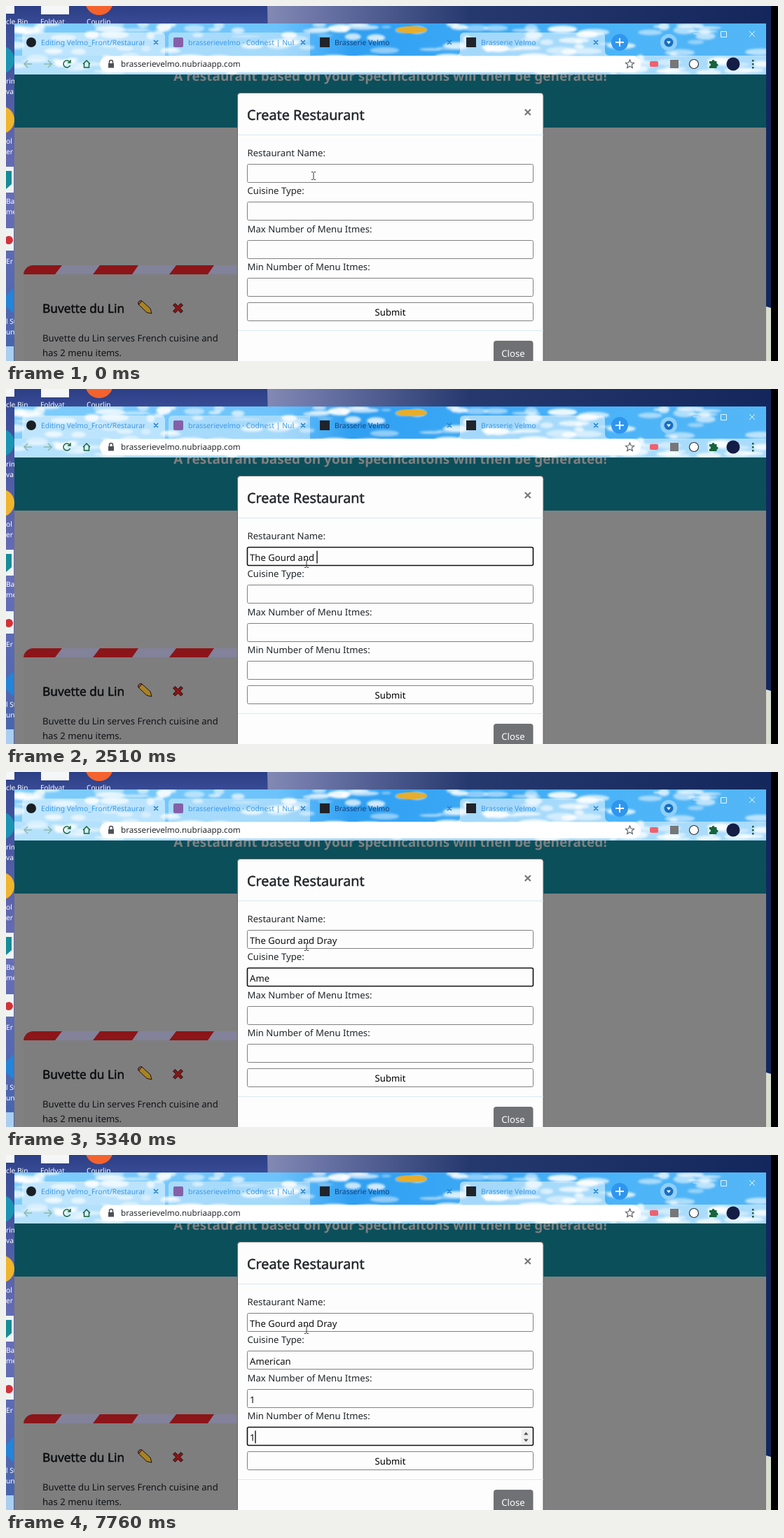
An HTML page that plays this animation: 1102x508 px, repeating every 8 s.

```html
<!DOCTYPE html>
<html lang="en">
<head>
<meta charset="utf-8">
<title>Create Restaurant</title>
<style>
  html, body { margin: 0; width: 100%; height: 100%; overflow: hidden; background: #000; }
  svg { display: block; width: 1102px; height: 508px; }
  text { font: 13.15px "Noto Sans", "Open Sans", sans-serif; text-rendering: geometricPrecision; fill: #212529; white-space: pre; }
  .bold { font-weight: 600; }
  .semi { stroke: #212529; stroke-width: .5; }
  .tab { font-size: 10.4px; fill: #3b98e6; }
  .desk text { font-size: 10.2px; fill: #fff; }
  .mid { text-anchor: middle; }
  .line { fill: none; stroke-width: 1.5; }
</style>
</head>
<body>
<svg viewBox="0 0 1102 508">
  <defs>
    <linearGradient id="wall" x2="0" y2="1">
      <stop offset="0" stop-color="#2c3f86"/><stop offset=".06" stop-color="#3a4d97"/>
      <stop offset=".5" stop-color="#6a6fb8"/><stop offset="1" stop-color="#4664ad"/>
    </linearGradient>
    <linearGradient id="night">
      <stop offset="0" stop-color="#8289b4"/><stop offset=".12" stop-color="#6670a2"/>
      <stop offset=".4" stop-color="#26396f"/><stop offset="1" stop-color="#14275c"/>
    </linearGradient>
    <linearGradient id="sky">
      <stop offset="0" stop-color="#7fcdfb"/><stop offset=".35" stop-color="#6cc3fb"/>
      <stop offset=".45" stop-color="#2f9ff2"/><stop offset=".8" stop-color="#4bb4f8"/><stop offset="1" stop-color="#54b6f6"/>
    </linearGradient>
    <filter id="soft"><feGaussianBlur stdDeviation="1.5"/></filter>
    <clipPath id="bar"><path d="M12 25H1085V98H12Z"/></clipPath>
    <clipPath id="page"><path d="M12 98H1085V508H12Z"/></clipPath>
    <clipPath id="card"><rect x="25" y="371" width="320" height="160" rx="14"/></clipPath>
    <clipPath id="tabs"><path d="M48 38H198V66H48ZM258 38H411V66H258Z"/></clipPath>
  </defs>

  <!-- Desktop -->
  <g class="desk">
    <path fill="url(#wall)" d="M0 0H400V508H0Z"/>
    <path fill="url(#night)" d="M373 0H1092V508H385Z"/>
    <path fill="#d9dfd0" d="M1085 430L1092 432V508H1085Z"/>
    <path fill="#f4f6f8" d="M50 0H90V12H50ZM0 0H12V11H0Z"/>
    <circle cx="133" cy="-7" r="20" fill="#f4622d"/>
    <circle cx="-8" cy="77" r="20" fill="#1a93b4"/>
    <circle cx="-8" cy="163" r="20" fill="#f0b52c"/>
    <path fill="#eef4f4" d="M0 230H11V267H0ZM0 318H11V350H0Z"/>
    <path fill="#168c96" d="M0 236H8V255L0 262Z"/>
    <circle cx="4" cy="335" r="6" fill="#d3323a"/>
    <path fill="#2484d8" d="M0 415L11 403V440L0 430Z"/>
    <path fill="#a9cef2" d="M0 487H11V508H0Z"/>
    <text x="0" y="26">cle Bin</text><text x="49" y="26">Foldvat</text><text x="115" y="26">Courlin</text>
    <g id="icons"></g>
  </g>

  <!-- Browser bar -->
  <g clip-path="url(#bar)">
    <path fill="url(#sky)" d="M12 25H1085V98H12Z"/>
    <path fill="#fff" opacity=".5" d="M23 71V44q0-6 6-6H221q6 0 6 6V71Z"/>
    <path fill="#d4edfc" opacity=".55" d="M232 71V44q0-6 6-6H434V71Z"/>
    <path fill="#c7e9fd" opacity=".75" d="M641 71q7 0 7-7V44q0-6 6-6H849q6 0 6 6V64q0 7 7 7H1085V98H12V71Z"/>
    <g id="clouds" fill="#fff" filter="url(#soft)"></g>
    <ellipse cx="579" cy="34" rx="22" ry="5" fill="#e8ad2b"/>
    <circle cx="36" cy="52" r="7" fill="#1b1f23"/>
    <rect x="239" y="45" width="14" height="14" rx="2" fill="#8560a8"/>
    <path fill="#20232a" d="M448 45h14v14h-14ZM657 45h14v14h-14Z"/>
    <g clip-path="url(#tabs)">
      <text class="tab" x="50" y="56">Editing Velmo_Front/Restaurant</text>
      <text class="tab" x="260" y="56">brasserievelmo · Codnest | Nubria</text>
    </g>
    <text class="tab" x="469" y="56" style="fill:#153e78">Brasserie Velmo</text>
    <text class="tab" x="678" y="56">Brasserie Velmo</text>
    <path class="line" stroke="#1f7fd0" d="M211 49l6 6m0-6l-6 6M421 49l6 6m0-6l-6 6M630 49l6 6m0-6l-6 6M839 49l6 6m0-6l-6 6"/>
    <circle cx="876" cy="52" r="12" fill="#2f96ee"/>
    <path stroke="#fff" stroke-width="2" d="M870 52h12M876 46v12"/>
    <circle cx="946" cy="52" r="12" fill="#8fd0fa"/>
    <circle cx="946" cy="52" r="6.5" fill="#176fc0"/>
    <path fill="#fff" d="M943 50.500h6l-3 4Z"/>
    <path class="line" stroke="#e6f5ff" style="stroke-width:1" d="M981 40h8M1020.500 36.500h8v8h-8ZM1061 36l8 8m0-8l-8 8"/>

    <rect x="134" y="71.500" width="772" height="23.500" rx="11.700" fill="#fff"/>
    <path class="line" stroke="#8fb9ad" d="M37 83H26M31 78l-5 5 5 5M54 83H65M60 78l5 5-5 5"/>
    <path class="line" stroke="#17643c" d="M91 80a5 5 0 1 0 .6 5M92 77v4h-4M110 83l5-5 5 5M111.500 82v6h7v-6"/>
    <path fill="#4d5156" d="M146 82h8v6.500h-8Z"/>
    <path class="line" stroke="#4d5156" d="M147.500 82v-2a2.500 2.500 0 0 1 5 0v2"/>
    <text x="164" y="87.200" style="font-size:11.7px;fill:#25282c">brasserievelmo.nubriaapp.com</text>
    <path class="line" stroke="#5f6368" style="stroke-width:1.200" d="M890.500 77l1.700 4 4.300.4-3.200 2.900 1 4.300-3.800-2.300-3.800 2.300 1-4.300-3.200-2.900 4.300-.4Z"/>
    <rect x="919" y="79" width="12" height="8" rx="2" fill="#f0606e"/>
    <rect x="948" y="77" width="12" height="12" fill="#777"/>
    <circle cx="982" cy="83" r="6.500" fill="#fff" stroke="#333" stroke-width="1.200"/>
    <path fill="#17643c" d="M1004 79h3.500a2 2 0 0 1 4 0h3v3.500a2 2 0 0 1 0 4v2.500h-10.500v-3a2 2 0 0 0 0-4Z"/>
    <circle cx="1038" cy="83" r="9.500" fill="#141d45"/>
    <path fill="#26543f" d="M1065 77h2.500v2.500h-2.500ZM1065 82h2.500v2.500h-2.500ZM1065 87h2.500v2.500h-2.500Z"/>
  </g>

  <!-- Dimmed page -->
  <g clip-path="url(#page)">
    <path fill="#808080" d="M12 98H1085V508H12Z"/>
    <path fill="#0b4f5b" d="M12 98H1085V174H12Z"/>
    <text class="bold mid" x="548.500" y="106.500" style="font-size:19px;fill:#808080">A restaurant based on your specificaitons will then be generated!</text>
    <g clip-path="url(#card)">
      <path fill="#7e7e7f" d="M25 371H345V508H25Z"/>
      <path fill="#82829a" d="M25 371H345V384H25Z"/>
      <path fill="#8b1518" d="M25 371H80L70 384H25ZM134 371H189L180 384H124ZM243 371H297L288 384H233Z"/>
    </g>
    <text class="semi" x="52" y="438.500" style="font-size:17.3px;fill:#0c0d0f;stroke:#0c0d0f">Buvette du Lin</text>
    <text x="52" y="479.500" style="fill:#111315">Buvette du Lin serves French cuisine and</text>
    <text x="52" y="500.500" style="fill:#111315">has 2 menu items.</text>
    <g stroke="#191510" stroke-width="1">
      <path fill="#a98222" d="M191 424l3-2 12 11 2 7-7-1.500-12-11.500Z"/>
      <path fill="#9b4a50" d="M189 427l-.500-3 3-2.500 2.500.500-4 5Z"/>
      <path fill="#8a1416" d="M238.500 428l3-2.500 4 4 4-4 3 2.500-4 4.300 4 4.300-3 2.600-4-4-4 4-3-2.600 4-4.300Z"/>
    </g>
  </g>

  <!-- Dialog -->
  <rect x="330.500" y="124.500" width="436.500" height="400" rx="4" fill="#fdfdfd" stroke="#666"/>
  <path stroke="#d8e8f3" d="M331 184.500H767M331 464.500H767"/>
  <text class="semi" x="344" y="163" style="font-size:19.8px">Create Restaurant</text>
  <path stroke="#777" stroke-width="2.200" d="M740.800 148l8 8m0-8l-8 8"/>
  <g id="form"></g>
  <rect x="344.500" y="424.500" width="408" height="26" rx="2" fill="#fdfdfd" stroke="#808080"/>
  <text class="mid" x="548.500" y="442.700" style="fill:#000">Submit</text>
  <rect x="696" y="479" width="56.500" height="40" rx="4" fill="#6f7174"/>
  <text class="mid" x="724" y="501.500" style="fill:#fff">Close</text>
  <g id="spin">
    <path fill="#efefef" d="M735.500 3H749V24H735.500Z"/>
    <path fill="#505050" d="M739 10.500l3.300-4 3.300 4ZM739 16.500l3.300 4 3.300-4Z"/>
  </g>
  <path id="caret" stroke="#000" stroke-width="1.300" d="M0 0V18"/>
  <path id="mouse" class="line" stroke="#333" style="stroke-width:1" d="M-3-5.500H-1L0-4.500 1-5.500H3M0-4.500V4.500M-3 5.500H-1L0 4.500 1 5.500H3"/>
</svg>
<script>
const $ = id => document.getElementById(id);
function add(parent, tag, attrs, text = "") {
  const el = document.createElementNS("http://www.w3.org/2000/svg", tag);
  for (const k in attrs) el.setAttribute(k, attrs[k]);
  el.textContent = text;
  return parent.appendChild(el);
}

// Clouds lie thickest along the toolbar, thinner at the top edge and over the tabs.
let seed = 7;
const rnd = () => (seed = seed * 16807 % 2147483647) / 2147483647;
for (let i = 0; i < 170; i++) {
  const band = rnd(), y = band < .5 ? 72 + 24 * rnd() : band < .75 ? 25 + 13 * rnd() : 40 + 30 * rnd();
  add($("clouds"), "ellipse", { cx: 12 + 1073 * rnd(), cy: y,
    rx: 5 + 18 * rnd(), ry: 1.5 + 4.5 * rnd(), opacity: .4 + .5 * rnd() });
}

[[111, "rim"], [126, "va"], [197, "ol"], [212, "er"], [283, "Bar"], [298, "me"], [369, "Er"], [455, "l St"], [470, "un"]]
  .forEach(([y, s]) => add($("icons"), "text", { x: 0, y }, s));

const labels = ["Restaurant Name:", "Cuisine Type:", "Max Number of Menu Itmes:", "Min Number of Menu Itmes:"];
const values = ["The Gourd and Dray", "American", "1", "1"];
const top0 = 227, pitch = 54.25;
const fields = labels.map((label, i) => {
  const y = Math.round(top0 + i * pitch);
  add($("form"), "text", { x: 344.5, y: y - 12 }, label);
  const box = add($("form"), "rect", { x: 344.5, y: y - .5, width: 408, height: 26, rx: 2, fill: "#fdfdfd" });
  const text = add($("form"), "text", { x: 348, y: y + 19, style: "fill:#111" });
  return { y, box, text };
});

// [time, focused field, typed characters, caret hidden]
const steps = [
  [0, -1, 0], [510, 0, 0], [940, 0, 1], [1090, 0, 3], [1240, 0, 4], [1510, 0, 5], [1630, 0, 6], [1750, 0, 8],
  [2000, 0, 9], [2150, 0, 11], [2270, 0, 12], [2390, 0, 13], [2510, 0, 14], [3130, 0, 15], [3500, 0, 16], [3820, 0, 18],
  [4110, 1, 0], [4480, 1, 1], [4630, 1, 2], [4750, 1, 3], [5340, 1, 3, true], [5460, 1, 4], [5610, 1, 5], [5760, 1, 6], [5880, 1, 8],
  [6530, 2, 0], [6930, 2, 0, true], [7050, 2, 1], [7330, 3, 0], [7760, 3, 1]
];
const pointer = [[0, 439, 243], [150, 435, 254], [270, 430, 257], [390, 429, 250]];
const at = (list, t) => list.filter(s => s[0] <= t).pop();
const show = (el, on) => el.setAttribute("visibility", on ? "visible" : "hidden");
const move = (el, x, y) => el.setAttribute("transform", `translate(${x} ${y})`);

function draw(t) {
  const [, focus, typed, hidden] = at(steps, t);
  fields.forEach(({ box, text }, i) => {
    const on = i === focus;
    box.setAttribute("stroke", on ? "#101010" : "#808080");
    box.setAttribute("stroke-width", on ? 1.6 : 1);
    text.textContent = i < focus ? values[i] : on ? values[i].slice(0, typed) : "";
  });
  show($("caret"), focus >= 0 && !hidden);
  show($("spin"), focus > 1);
  if (focus >= 0) {
    const { y, text } = fields[focus];
    move($("caret"), 348.5 + (typed ? text.getComputedTextLength() : 0), y + 4.5);
    move($("spin"), 0, y);
  }
  const [, x, y] = at(pointer, t);
  move($("mouse"), x, y);
}

const start = performance.now();
function tick() {
  draw((performance.now() - start) % 8000);
  requestAnimationFrame(tick);
}
tick();
</script>
</body>
</html>
```
